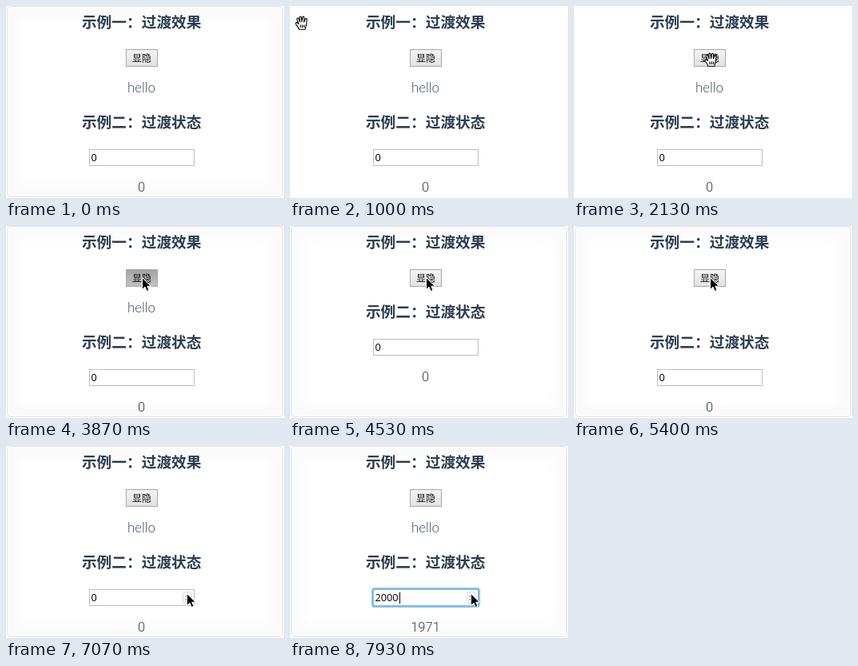
An HTML page that plays this animation: 348 px wide and 240 px high, repeating every 8000 ms.

```html
<!DOCTYPE html>
<html lang="zh-CN">
<head>
<meta charset="utf-8">
<title>过渡</title>
<style>
  html, body { margin: 0; width: 100%; height: 100%; overflow: hidden; background: #fff; }
  svg { position: absolute; left: 0; top: 0; }
  #frame {
    position: absolute; left: 1px; top: 0; width: 346px; height: 239px;
    box-sizing: border-box; border: 1px solid #e4e4e4; border-radius: 5px;
    box-shadow: inset 0 0 16px 15px #fbfbfb;
  }
  text { fill: #2c3e50; text-anchor: middle; }
  .title { font: bold 18.72px "Noto Sans CJK SC", "Noto Sans CJK", sans-serif; }
  .label { font: 12px "Noto Sans CJK SC", "Noto Sans CJK", sans-serif; fill: #111; }
  .body { font: 300 17px Lato, sans-serif; }
  .count { font: 300 16.5px Roboto, sans-serif; }
  .field { font: 12.7px "Open Sans", sans-serif; fill: #000; text-anchor: start; }
</style>
</head>
<body>
<div id="frame"></div>
<svg width="348" height="240" viewBox="0 0 348 240">
  <defs>
    <linearGradient id="up" x2="0" y2="1">
      <stop stop-color="#f4f4f4"/><stop offset="1" stop-color="#e2e2e2"/>
    </linearGradient>
    <linearGradient id="down" x2="0" y2="1">
      <stop stop-color="#a2a2a2"/><stop offset="1" stop-color="#c2c2c2"/>
    </linearGradient>
  </defs>

  <text class="title" x="169.7" y="27.3">示例一：过渡效果</text>
  <rect id="button" x="150.5" y="54.5" width="39" height="21" fill="url(#up)" stroke="#a8a8a8"/>
  <text class="label" x="170" y="69.5">显隐</text>
  <text id="hello" class="body" x="169.5" y="108.3">hello</text>

  <g id="lower">
    <text class="title" x="169.7" y="152.3">示例二：过渡状态</text>
    <rect x="104.5" y="179.5" width="131" height="20" fill="#fff" stroke="#bdbdbd"/>
    <g id="focus" fill="none">
      <rect x="102.5" y="177.5" width="135" height="24" rx="3.5" stroke="#d3eafa" stroke-width="2"/>
      <rect x="103.5" y="178.5" width="133" height="22" rx="2" stroke="#6db8ef" stroke-width="2"/>
      <path d="M137.5 183V197" stroke="#000"/>
    </g>
    <g id="spinner">
      <rect x="221.5" y="182.5" width="11" height="15" rx="4" fill="#fff" stroke="#d4d4d4"/>
      <path d="M224.5 188.5l2.5-3 2.5 3zM224.5 191.5l2.5 3 2.5-3z" fill="#333"/>
    </g>
    <text id="value" class="field" x="106.5" y="194">0</text>
    <text id="count" class="count" x="169.5" y="232.3">0</text>
  </g>

  <g id="hand" fill="#fff" stroke="#000" stroke-width="1.1" stroke-linejoin="round">
    <path d="M5 17.3C4.5 14.8 2.4 12.7 1.2 10.8C.2 9 2.1 8 3.5 9.5L4.6 10.6L2.6 5C2 3 4 2.4 4.8 4.2L6.2 8L5.8 2.6C5.8.7 7.8.6 8 2.5L8.6 7.8L9.4 2.4C9.7.7 11.6.9 11.5 2.8L11.3 8L12.9 4.6C13.6 3 15.3 3.6 14.9 5.4C14.2 8.6 15 11 13.7 13.2L12.8 17.3Z"/>
    <path d="M7 11.5V15M9.3 11.5V15M11.5 11.5V15" fill="none"/>
  </g>
  <path id="arrow" fill="#000" stroke="#fff" stroke-linejoin="round"
    d="M.5.5V15.5L4 12.2L6.3 17.5L9 16.3L6.8 11.2H11.2Z"/>
</svg>
<script>
  const LOOP = 8000, TICK = 200 / 3, SHIFT = -38;
  const $ = id => document.getElementById(id);
  const [frame, button, hello, lower, focus, spinner, value, count, hand, arrow] =
    ['frame', 'button', 'hello', 'lower', 'focus', 'spinner', 'value', 'count', 'hand', 'arrow'].map($);

  // Rows of [time, ...values]
  const handPath = [[930, -6, 7], [1470, 87, 44], [1730, 137, 55], [1930, 157, 58], [2130, 163, 58]];
  const arrowPath = [[6200, 170, 64], [6270, 174, 76], [6400, 189, 132], [6530, 203.5, 176],
    [6800, 221, 187], [7070, 226, 184]];
  const fade = [[4067, 1], [4127, .7], [4187, .32], [4247, .11], [4350, 0],
    [5400, 0], [5460, .3], [5520, .68], [5580, .89], [5733, 1]];

  function at(track, t) {
    const i = track.findIndex(row => row[0] > t);
    if (i === 0) return track[0].slice(1);
    if (i < 0) return track[track.length - 1].slice(1);
    const a = track[i - 1], b = track[i], p = (t - a[0]) / (b[0] - a[0]);
    return a.slice(1).map((v, k) => v + (b[k + 1] - v) * p);
  }

  const within = (t, from, to) => t >= from && t < to;
  const show = (el, on) => { el.style.visibility = on ? 'visible' : 'hidden'; };
  const place = (el, [x, y]) => el.setAttribute('transform', `translate(${x.toFixed(1)} ${y.toFixed(1)})`);

  function render(time) {
    const t = Math.floor((time + 4) / TICK) * TICK + 1;
    const pressed = within(t, 3865, 4065) || within(t, 5265, 5395);
    const typed = t >= 7600;
    const left = 1 - Math.min(1, Math.max(0, (t - 7601) / 379));

    show(frame, !within(t, 465, 2530));
    show(hand, within(t, 930, 2600));
    show(arrow, t >= 2600);
    show(focus, typed);
    show(spinner, t >= 6900);
    place(hand, at(handPath, t));
    place(arrow, at(arrowPath, t));
    place(lower, [0, within(t, 4465, 5395) ? SHIFT : 0]);
    button.setAttribute('fill', pressed ? 'url(#down)' : 'url(#up)');
    hello.style.opacity = at(fade, t)[0];
    value.textContent = typed ? 2000 : 0;
    count.textContent = Math.round(2000 * (1 - left * left));
  }

  const start = performance.now();
  function loop() {
    render((performance.now() - start) % LOOP);
    requestAnimationFrame(loop);
  }
  loop();
</script>
</body>
</html>
```
